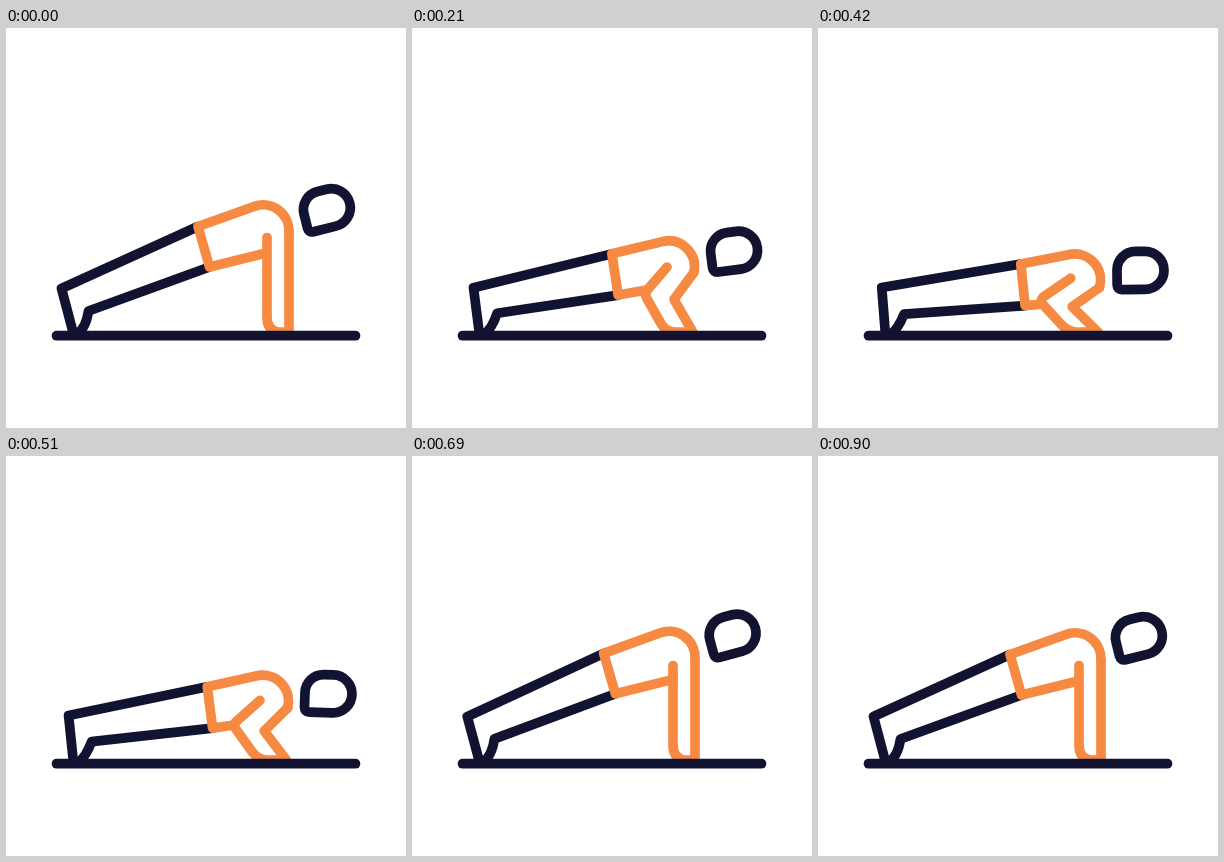
These frames come from a looping animation (400x400 px, 930 ms). An HTML page:

```html
<!DOCTYPE html>
<html lang="en">
<head>
<meta charset="utf-8">
<title>Push-up</title>
<style>
  html, body { margin: 0; width: 100%; height: 100%; overflow: hidden; background: #fff; }
  svg { display: block; width: 100vw; height: 100vh; }
  path { fill: none; stroke: #121331; stroke-width: 9.7; stroke-linecap: round; stroke-linejoin: round; }
  .skin { stroke: #f68a43; }
</style>
</head>
<body>
<svg viewBox="0 0 400 400">
  <path id="legs"/>
  <path id="shirt" class="skin"/>
  <path id="arm" class="skin"/>
  <path d="M50.5 307.7H349.5"/>
  <path id="head" d="M34 19H57A19 19 0 0 0 57-19H47.5A18.5 18.5 0 0 0 29-.5V14Q29 19 34 19Z"/>
</svg>
<script>
const LOOP = 930, STEP = 30;
const $ = id => document.getElementById(id);

// Each part: raised pose, lowered pose
const poses = {
  legs: [
    'M192 198.5 L55.5 260.5 L67.5 306 M203.5 239 L82.5 283 Q80 300 71 306',
    'M202.5 235 L63.5 259.5 L67.5 307 M207 276.5 L86 286 Q80 301 72 307'
  ],
  shirt: [
    'M260 225 L203.5 239 L192 198.5 L248 178.5 A26 26 0 0 1 283 204',
    'M222 275 L207 276.5 L202.5 235 L254 224.7 A26 26 0 0 1 281.5 258'
  ],
  arm: [
    'M283 204 L283 252 L283 304 L272 304 Q261 302 261 289 L261 254 Q261 247 261 242 L261 209.5',
    'M281.5 258 L255 278 L280 304 L258 304 Q250 303 244.5 297 L226 276 Q222 271 228 267 L253 249'
  ]
};

const ramp = (t, from, to) => Math.min(1, Math.max(0, (t - from) / (to - from)));
const smooth = x => x * x * (3 - 2 * x);
const ease = (t, from, to) => smooth(ramp(t, from, to));

// Sink, push up slightly too far, settle
function depthAt(t) {
  const sink = smooth(1 - (1 - ramp(t, 0, 450)) ** 1.7);
  return 1.03 * sink - 1.08 * ease(t, 450, 710) + .05 * ease(t, 710, 900);
}

// The head follows the body a little late
function tiltAt(t) {
  return -14 + 16 * ramp(t, 0, 500) - 22 * ease(t, 530, 760) + 6 * ease(t, 760, 900);
}

function blend([up, down], p) {
  const to = down.match(/[\d.]+/g);
  let i = 0;
  return up.replace(/[\d.]+/g, x => +x + (to[i++] - x) * p);
}

function draw(t) {
  const depth = depthAt(t);
  const bend = Math.max(depth, 0);
  $('legs').setAttribute('d', blend(poses.legs, depth));
  $('shirt').setAttribute('d', blend(poses.shirt, depth));
  $('arm').setAttribute('d', blend(poses.arm, bend));
  $('head').setAttribute('transform',
    `translate(270 ${193.5 + 48 * depth}) rotate(${tiltAt(t)})`);
}

const start = performance.now();
function tick() {
  const t = (performance.now() - start) % LOOP;
  draw(Math.floor(t / STEP) * STEP);
  requestAnimationFrame(tick);
}
tick();
</script>
</body>
</html>
```
